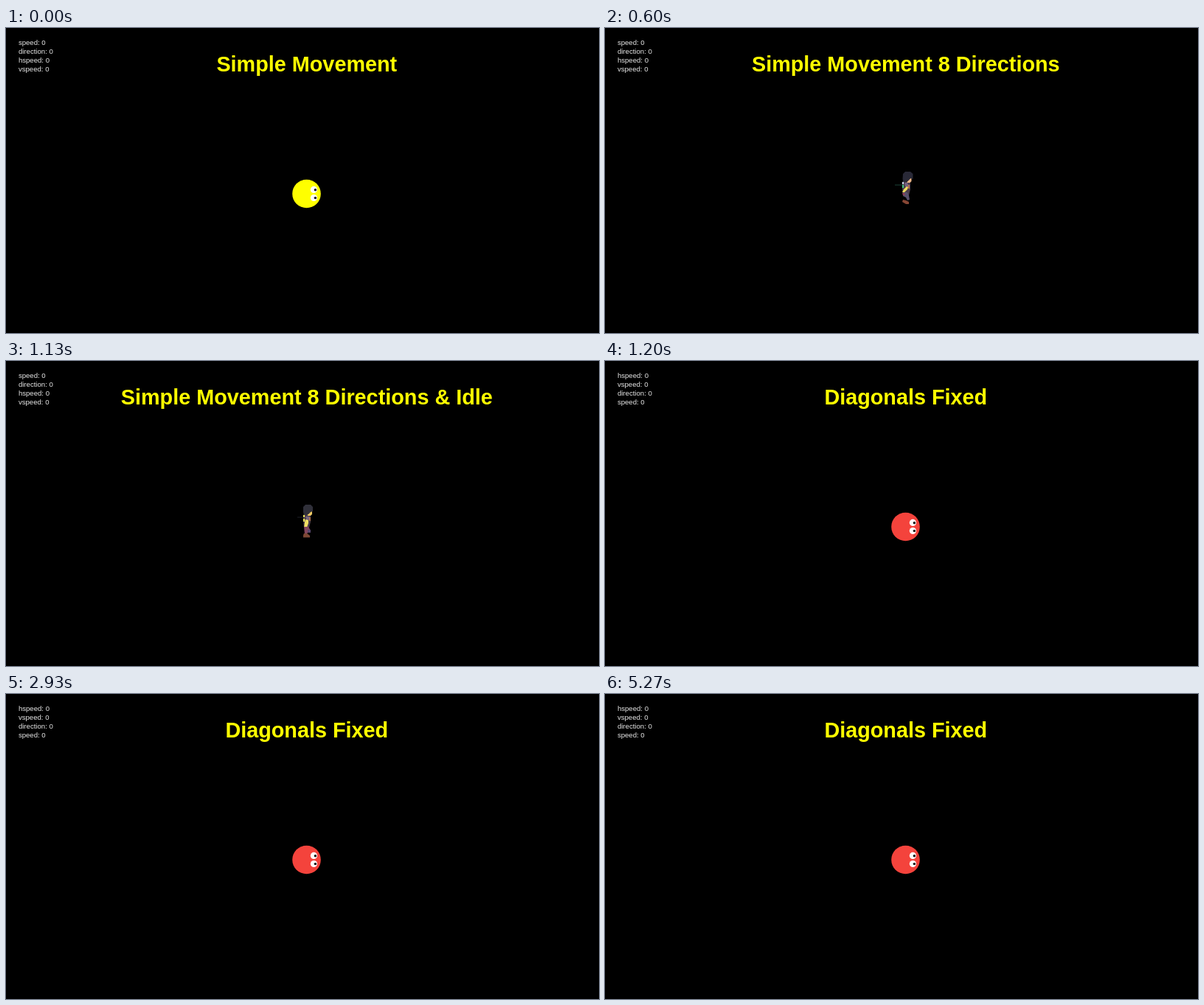
Recreate the animation shown at these times as an HTML page. Size 804 by 414 pixels, loop 5330 ms.

```html
<!DOCTYPE html>
<html lang="en">
<head>
<meta charset="utf-8">
<title>Movement demos</title>
<style>
  html, body { margin: 0; width: 100%; height: 100%; overflow: hidden; background: #000; }
  svg { display: block; width: 804px; height: 414px; }
  text { font-family: "Liberation Sans", Arial, sans-serif; }
  #title { font-size: 28.8px; font-weight: bold; fill: #ff0; text-anchor: middle; }
  #stats { font-size: 9.6px; fill: #e8e8e8; }
</style>
</head>
<body>
<svg viewBox="0 0 804 414">
  <rect width="804" height="414"/>
  <g id="stats"></g>
  <text id="title" x="407.8" y="59"></text>

  <g id="ball">
    <circle cx="407.5" cy="225" r="19.3" fill="currentColor"/>
    <g fill="#fff">
      <circle cx="417.4" cy="219.4" r="4.6"/>
      <circle cx="417.4" cy="230.5" r="4.6"/>
    </g>
    <g fill="#000">
      <circle cx="419.4" cy="219.8" r="1.7"/>
      <circle cx="419.4" cy="230.6" r="1.7"/>
    </g>
  </g>

  <g id="walker">
    <path d="M393 212.5h11v1.2h-11z" fill="#16392f"/>
    <path d="M404 206h8l2 5v8l-2 8h-8l-1-9z" fill="#4a3c4c"/>
    <path d="M409 204h6.500v4l-2 2h-4z" fill="#f0b888"/>
    <path d="M404 198l3-3h7l3.500 3v7l-3-1-3 3-2 2h-5l-1-4z" fill="#292937"/>
    <path d="M403 209h2v3h-2z" fill="#cfd8ec"/>
    <path d="M403 213h2v4h-2z" fill="#45c483"/>
    <path d="M406 210h4l2 4-2 3-3-2z" fill="#74607e"/>
    <path d="M409 215l2 1-1 3-4 4h-3l2-4z" fill="#f1dc5c"/>
    <path d="M411 213h2v5h-2z" fill="#b86e50"/>
    <path d="M404 223h6l2 4 1 6-3 1-2-4-4-2z" fill="#57506b"/>
    <path d="M403 224h3l1 3h-3z" fill="#8c3e58"/>
    <path d="M404 233l4 1 4 2v3h-4l-5-3z" fill="#874634"/>
  </g>

  <g id="idler">
    <path d="M395 211.500h8v1.200h-8z" fill="#191b20"/>
    <path d="M404 206h8l1 5v7l-2 8h-7l-1-9z" fill="#4a3c4c"/>
    <path d="M408 204h7v4l-2 2h-4z" fill="#edc965"/>
    <path d="M403 198l3-3h7l3 3v6l-3 1-3 3-2 1h-4l-1-4z" fill="#30303a"/>
    <path d="M403 209h2v3h-2zM403 214h2v4h-2z" fill="#e9e45b"/>
    <path d="M406 211h5l1 4-4 2z" fill="#77677d"/>
    <path d="M406 215l4 1v4l-2 6h-4l1-7z" fill="#f1df63"/>
    <path d="M411 212h2v5h-2z" fill="#a56d50"/>
    <path d="M404 225h6l3 5v3h-4l-1 2h-3z" fill="#82465e"/>
    <path d="M409 229h4v4h-4z" fill="#57476b"/>
    <path d="M404 234h4l4 3v2.500h-9v-3z" fill="#7d4835"/>
  </g>
</svg>
<script>
  const LOOP = 5330;
  const basic = ["speed", "direction", "hspeed", "vspeed"];
  const fixed = ["hspeed", "vspeed", "direction", "speed"];
  const scenes = [
    { at: 0, title: "Simple Movement", stats: basic, actor: "ball", color: "#ff0" },
    { at: 400, title: "Simple Movement 8 Directions", stats: basic, actor: "walker" },
    { at: 800, title: "Simple Movement 8 Directions & Idle", stats: basic, actor: "idler" },
    { at: 1200, title: "Diagonals Fixed", stats: fixed, actor: "ball", color: "#f4433c" }
  ];
  const byId = id => document.getElementById(id);
  const actors = ["ball", "walker", "idler"].map(byId);

  const lines = basic.map((_, i) => {
    const line = document.createElementNS("http://www.w3.org/2000/svg", "text");
    line.setAttribute("x", 16.9);
    line.setAttribute("y", 22.9 + i * 12);
    return byId("stats").appendChild(line);
  });

  let shown;
  function show(scene) {
    if (scene === shown) return;
    shown = scene;
    byId("title").textContent = scene.title;
    lines.forEach((line, i) => line.textContent = scene.stats[i] + ": 0");
    actors.forEach(a => a.style.display = a.id === scene.actor ? "" : "none");
    byId("ball").style.color = scene.color || "";
  }

  const start = performance.now();
  function tick() {
    const t = (performance.now() - start) % LOOP;
    show(scenes.filter(s => s.at <= t).pop() || scenes[0]);
    requestAnimationFrame(tick);
  }
  tick();
</script>
</body>
</html>
```
